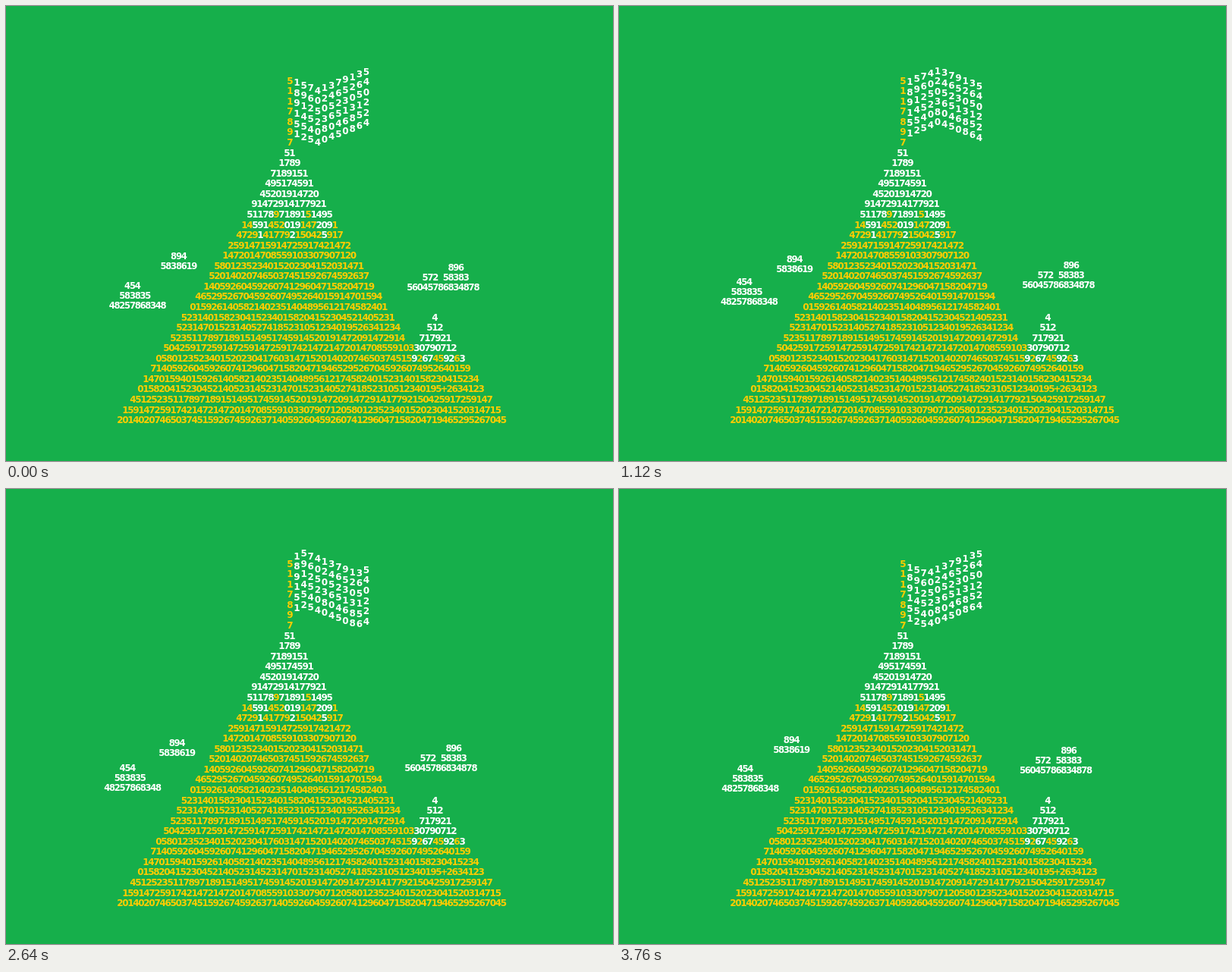
Animation, 800 px wide and 600 px high, one loop 3840 ms. Source, as an HTML page with a canvas:

```html
<!DOCTYPE html>
<html lang="en">
<head>
<meta charset="utf-8">
<style>
html, body { margin: 0; width: 100%; height: 100%; overflow: hidden; background: #16af4b; }
canvas { display: block; }
</style>
</head>
<body>
<canvas id="stage" width="800" height="600"></canvas>
<script>
const ctx = document.getElementById('stage').getContext('2d');
const LOOP = 3840, STEP = 80, LINE = 13.56, PITCH = 7.02;
const WHITE = '#ffffff', YELLOW = '#ffcc00';

// Left edge and digits of each line; "|" switches between yellow and white.
const mountain = [
  [367, '|51'],
  [360, '|1789'],
  [349, '|7189151'],
  [342, '|495174591'],
  [335, '|45201914720'],
  [324, '|91472914177921'],
  [318, '|51178|9|71891|5|1495'],
  [311, '14|591|452|019|147|209|1'],
  [304, '4729|1|41779|2|15042|5|917'],
  [293, '25914715914725917421472'],
  [286, '1472014708559103307907120'],
  [275, '5801235234015202304152031471'],
  [268, '520140207465037451592674592637'],
  [261, '14059260459260741296047158204719'],
  [250, '46529526704592607495264015914701594'],
  [243, '0159261405821402351404895612174582401'],
  [231.5, '5231401582304152340158204152304521405231'],
  [225, '523147015231405274185231051234019526341234'],
  [217, '52351178971891514951745914520191472091472914'],
  [208, '50425917259147259147259174214721472014708559103|30790712'],
  [198, '058012352340152023041760314715201402074650374515|9|2|67|45|92|6|3'],
  [191, '714059260459260741296047158204719465295267045926074952640159'],
  [181, '147015940159261405821402351404895612174582401523140158230415234'],
  [174, '015820415230452140523145231470152314052741852310512340195+2634123'],
  [164, '45125235117897189151495174591452019147209147291417792150425917259147'],
  [154, '15914725917421472147201470855910330790712058012352340152023041520314715'],
  [147, '2014020746503745159267459263714059260459260741296047158204719465295267045']
];
const sidePeak = [[562, '|4'], [555, '|512'], [545, '|717921']];
const flag = ['15741379135', '89602465264', '91250523050', '14523651312', '55408046852', '12540450864'];

const keyTimes = [0, 640, 1120, 1760, 2640, 3280, LOOP];
const clouds = [
  { lines: ['  894', '5838619'],
    x: [204.3, 207, 208, 205.5, 202, 202.5], y: [343, 344.7, 346.4, 348, 347.3, 345] },
  { lines: ['   454', '  583835', '48257868348'],
    x: [136.5, 136, 134.8, 131, 130, 133.5], y: [395, 392, 389.6, 390, 394, 394.5] },
  { lines: ['        896', '   572 58383', '56045786834878'],
    x: [529, 531, 532, 529.3, 526, 527], y: [371, 369.6, 368, 367.4, 368.2, 370.1] }
];

function digit(ch, x, y, size = 12) {
  ctx.font = `bold ${size}px "DejaVu Sans", sans-serif`;
  ctx.fillText(ch, x, y + size * 0.365);
}

function line(text, left, y, pitch, size) {
  let x = left - 0.1 + pitch / 2;
  for (const ch of text) {
    if (ch === '|') {
      ctx.fillStyle = ctx.fillStyle === WHITE ? YELLOW : WHITE;
    } else {
      digit(ch, x, y, size);
      x += pitch;
    }
  }
}

function rows(list, top) {
  list.forEach(([left, text], i) => {
    ctx.fillStyle = YELLOW;
    line(text, left, top + i * LINE, PITCH);
  });
}

// Triangle wave moving right, 15 columns long
function wave(column, t) {
  const pos = (((column + 3.6 - t / 128) % 15) + 15) % 15;
  return 84.7 + 26.8 * (pos < 7.6 ? pos / 7.6 : (15 - pos) / 7.4);
}

function track(values, t) {
  const i = keyTimes.findIndex(k => k > t) - 1;
  const k = (t - keyTimes[i]) / (keyTimes[i + 1] - keyTimes[i]);
  return values[i] + (values[(i + 1) % values.length] - values[i]) * k;
}

function draw(t) {
  ctx.fillStyle = '#16af4b';
  ctx.fillRect(0, 0, 800, 600);
  ctx.textAlign = 'center';

  rows(mountain, 193.2);
  rows(sidePeak, 410.2);

  ctx.fillStyle = YELLOW;
  [...'5117897'].forEach((ch, i) => digit(ch, 374.3, 98.3 + i * LINE));

  ctx.fillStyle = WHITE;
  flag.forEach((text, r) => [...text].forEach((ch, c) =>
    digit(ch, 383.4 + c * 9.16, wave(c + 1, t) + r * LINE)));

  for (const { lines, x, y } of clouds) {
    const left = track(x, t), bottom = track(y, t);
    lines.forEach((text, i) =>
      line(text, left, bottom - (lines.length - 1 - i) * 13, 6.78, 11.6));
  }
}

const start = performance.now();
let shown = -1;
function tick() {
  const t = Math.floor((performance.now() - start) % LOOP / STEP) * STEP;
  if (t !== shown) draw(shown = t);
  requestAnimationFrame(tick);
}
tick();
</script>
</body>
</html>
```
